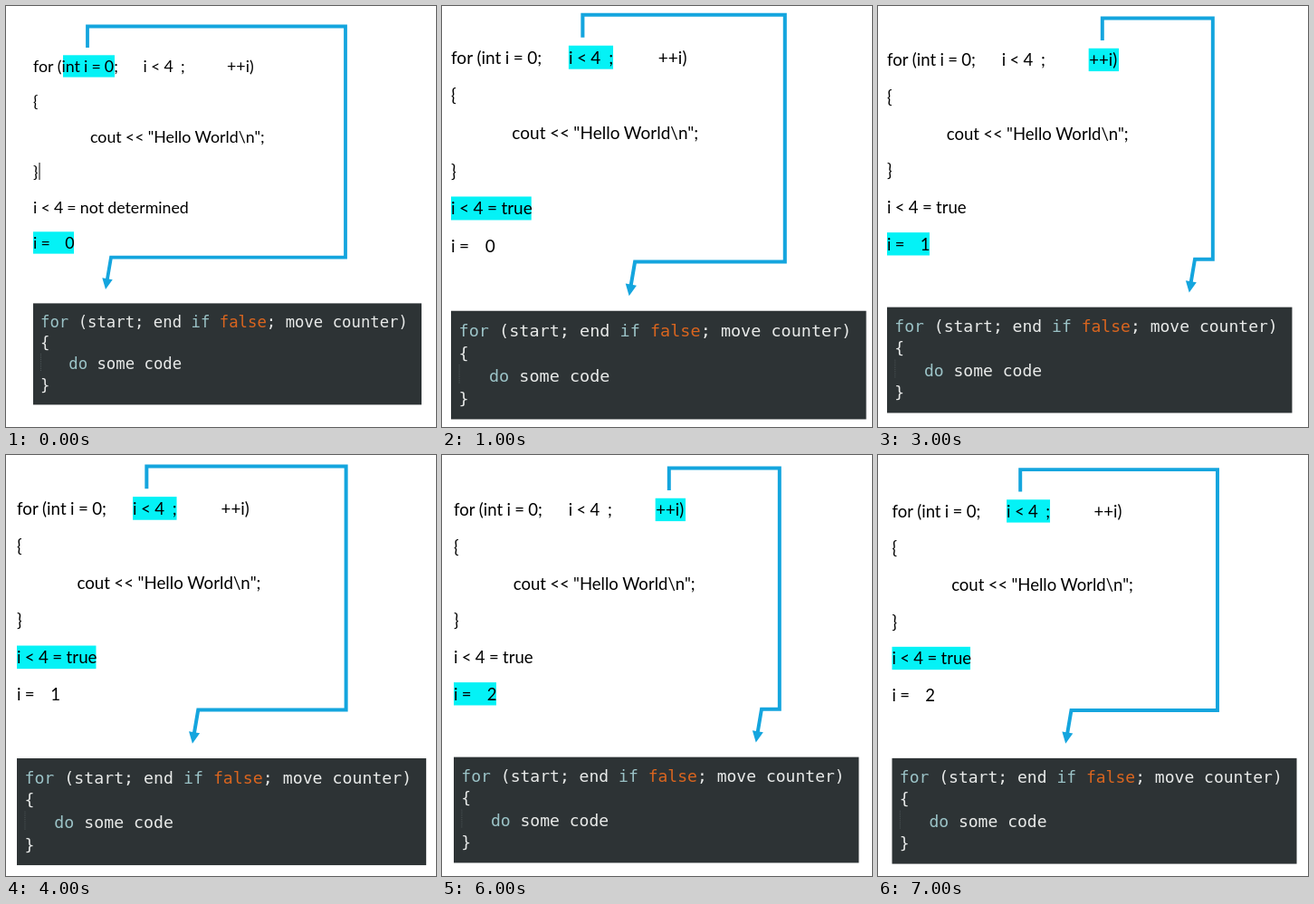
Write an HTML page with a canvas that moves like this. It is 475 by 465 pixels and loops after 8 s.

```html
<!DOCTYPE html>
<html lang="en">
<head>
<meta charset="utf-8">
<title>How a for loop runs</title>
<style>
  html, body { margin: 0; width: 100%; height: 100%; overflow: hidden; background: #fff; }
  canvas { display: block; }
</style>
</head>
<body>
<canvas id="stage" width="475" height="465"></canvas>
<script>
const ctx = document.getElementById('stage').getContext('2d');
const STEP_MS = 1000;
const LINE = 39;
const BODY = '17.8px Lato, sans-serif';
const CODE = '17.3px "DejaVu Sans Mono", monospace';
const CHAR = 10.41;
const BLUE = '#14a5de', CYAN = '#04f2f6';
const SLATE = '#2d3335', PALE = '#e8eae9', TEAL = '#9bc3c7', ORANGE = '#d9651f';

// Highlight boxes as [x, line, width]; paths end at the arrow tip.
const around = (from, to) => [[from, -21], [from, -44.5], [345, -44.5], [345, 210.7], [to + 6, 210.7], [to, 246]];
const stages = {
  start: { marks: [[33, 0, 57], [0, 5, 45]], path: around(60, 80) },
  test: { marks: [[121.5, 0, 46], [0, 4, 83]], path: around(136, 184) },
  body: { marks: [[63, 2, 193]], path: [[272, 77.8], [447, 77.8], [447, 332.8], [175.5, 327.5]] },
  move: { marks: [[213.5, 0, 32], [0, 5, 45]], path: around(228, 320) }
};

// Each step shows the same page at its own offset and zoom.
const steps = [
  { stage: 'start', x: 30, y: 67, zoom: 1, i: 0, test: 'not determined', caret: [6.5, 106] },
  { stage: 'test', x: 10, y: 57.3, zoom: 1.069, i: 0 },
  { stage: 'body', x: 10.3, y: 48, zoom: 1.014, i: 0, caret: [429.5, 355] },
  { stage: 'move', x: 10, y: 60, zoom: 1.043, i: 1 },
  { stage: 'test', x: 12, y: 59.5, zoom: 1.054, i: 1 },
  { stage: 'body', x: 4, y: 43.3, zoom: 1.027, i: 1 },
  { stage: 'move', x: 13, y: 61, zoom: 1.043, i: 2 },
  { stage: 'test', x: 15.5, y: 62.5, zoom: 1.042, i: 2 }
];

function write(text, x, y, color) {
  ctx.fillStyle = color;
  ctx.fillText(text, x, y);
}

function drawLoop({ i, test = 'true' }) {
  ctx.font = BODY;
  ctx.wordSpacing = '-0.4px';
  const put = (text, x, line) => write(text, x, line * LINE + 6, '#000');
  put('for (int i = 0;', 0, 0);
  put('i < 4  ;', 121.5, 0);
  put('++i)', 214, 0);
  put('{', 0, 1);
  put('cout << "Hello World\\n";', 63, 2);
  put('}', 0, 3);
  put('i < 4 = ' + test, 0, 4);
  put('i =', 0, 5);
  put(String(i), 35.3, 5);
  ctx.wordSpacing = '0px';
}

function drawPanel() {
  ctx.fillStyle = SLATE;
  ctx.fillRect(0, 261.4, 429, 112);
  ctx.font = CODE;
  const put = (text, column, row, color = PALE) =>
    write(text, 8 + column * CHAR, 287.5 + row * 23.4, color);
  put('for', 0, 0, TEAL);
  put('(start; end', 4, 0);
  put('if', 16, 0, TEAL);
  put('false', 19, 0, ORANGE);
  put('; move counter)', 24, 0);
  put('{', 0, 1);
  put('do', 3, 2, TEAL);
  put('some code', 6, 2);
  put('}', 0, 3);
  ctx.fillStyle = '#4b5355';
  for (let y = 317; y < 337; y += 2) ctx.fillRect(8, y, 1, 1);
}

function drawArrow(path) {
  const [tipX, tipY] = path[path.length - 1];
  const [fromX, fromY] = path[path.length - 2];
  const angle = Math.atan2(tipY - fromY, tipX - fromX);
  ctx.strokeStyle = ctx.fillStyle = BLUE;
  ctx.lineWidth = 3.8;
  ctx.beginPath();
  path.slice(0, -1).forEach(([x, y]) => ctx.lineTo(x, y));
  ctx.lineTo(tipX - 10 * Math.cos(angle), tipY - 10 * Math.sin(angle));
  ctx.stroke();
  ctx.save();
  ctx.translate(tipX, tipY);
  ctx.rotate(angle);
  ctx.beginPath();
  ctx.moveTo(0, 0);
  ctx.lineTo(-12, -5.8);
  ctx.lineTo(-12, 5.8);
  ctx.fill();
  ctx.restore();
}

function drawStep(step) {
  const { marks, path } = stages[step.stage];
  ctx.setTransform(1, 0, 0, 1, 0, 0);
  ctx.fillStyle = '#fff';
  ctx.fillRect(0, 0, 475, 465);
  ctx.setTransform(step.zoom, 0, 0, step.zoom, step.x, step.y);
  ctx.fillStyle = CYAN;
  marks.forEach(([x, line, width]) => ctx.fillRect(x, line * LINE - 12.7, width, 24.3));
  drawLoop(step);
  drawPanel();
  drawArrow(path);
  if (step.caret) {
    ctx.fillStyle = '#000';
    ctx.fillRect(...step.caret, 1, 19);
  }
}

const began = performance.now();
function frame() {
  const elapsed = performance.now() - began;
  drawStep(steps[Math.floor(elapsed / STEP_MS) % steps.length]);
  requestAnimationFrame(frame);
}
frame();
</script>
</body>
</html>
```
